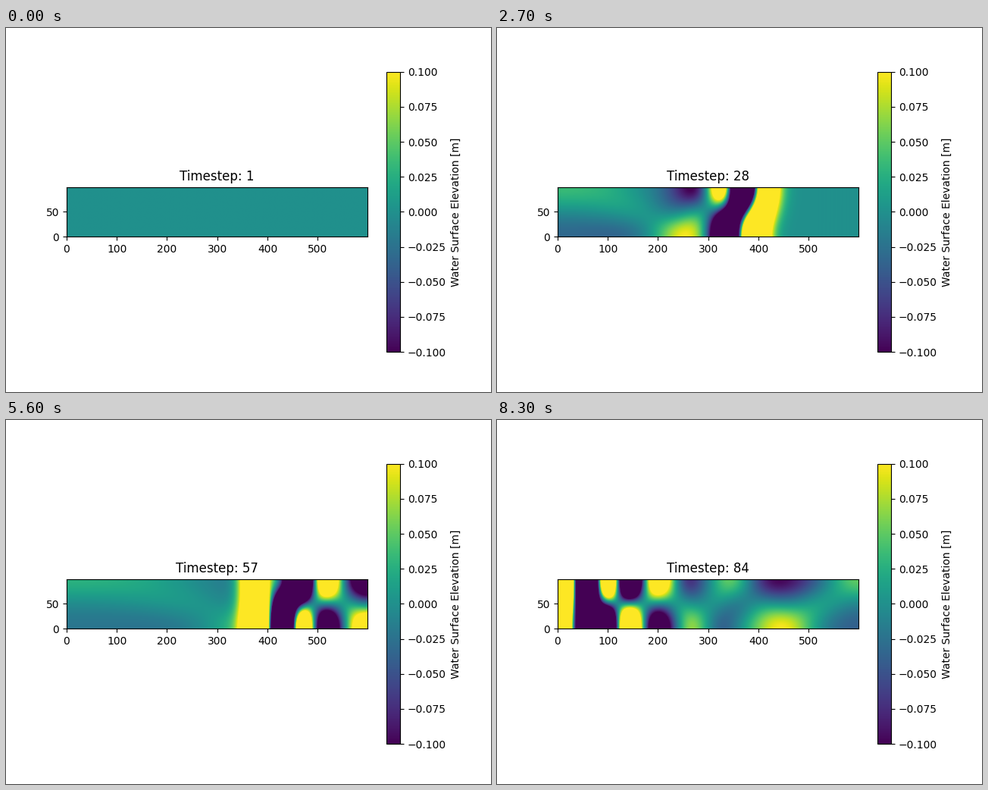
A matplotlib script that plays this animation: 640 by 480 pixels, repeating every 8.4 s.

```python
import numpy as np
import matplotlib.pyplot as plt
from matplotlib.animation import FuncAnimation

# Linear shallow water in a closed channel, driven by a moving pressure patch
# and solved exactly in cosine modes.
NX, NY, STEPS, SUB = 600, 100, 84, 20
WAVE_SPEED, SHIP_SPEED = 14.0, 15.0
SHIP_START, SHIP_LEN, SHIP_WIDTH = -12.0, 25.0, 32.0
PRESSURE = 0.185
MODES_X, MODES_Y = 150, 6


def cosine_basis(modes, cells):
    k = np.arange(modes) * np.pi / cells
    basis = np.cos(np.outer(k, np.arange(cells) + 0.5))
    norm = np.where(k > 0, 2.0, 1.0) / cells
    return k, basis, norm


def bump(pos, centre, size):
    return np.exp(-0.5 * ((pos - centre) / size) ** 2)


kx, bx, norm_x = cosine_basis(MODES_X, NX)
ky, by, norm_y = cosine_basis(MODES_Y, NY)
omega = WAVE_SPEED * np.hypot(ky[:, None], kx[None, :])
x = np.arange(NX) + 0.5
y = np.arange(NY) + 0.5
ship_y = PRESSURE * norm_y * (by @ bump(y, NY, SHIP_WIDTH))


def simulate():
    dt = 1.0 / SUB
    turn, swing = np.cos(omega * dt), np.sin(omega * dt)
    drift = dt * np.sinc(omega * dt / np.pi)
    level, rate = np.zeros_like(omega), np.zeros_like(omega)
    fields = [np.zeros((NY, NX))]
    for i in range((STEPS - 1) * SUB):
        centre = SHIP_START + SHIP_SPEED * (i + 0.5) * dt
        ship_x = norm_x * (bx @ bump(x, centre, SHIP_LEN))
        kick = -0.5 * dt * omega ** 2 * np.outer(ship_y, ship_x)
        rate = rate + kick
        level, rate = (level * turn + rate * drift,
                       rate * turn - level * omega * swing)
        rate = rate + kick
        if (i + 1) % SUB == 0:
            fields.append(by.T @ level @ bx)
    return fields


fields = simulate()

fig, ax = plt.subplots(figsize=(6.4, 4.8), dpi=100)
image = ax.imshow(fields[0], origin="lower", extent=(0, NX - 1, 0, NY - 1),
                  cmap="viridis", vmin=-0.1, vmax=0.1,
                  interpolation="bilinear")
ax.set_xticks(range(0, 600, 100))
ax.set_yticks([0, 50])
title = ax.set_title("Timestep: 1")
fig.colorbar(image, ax=ax, label="Water Surface Elevation [m]")


def draw(i):
    image.set_data(fields[i])
    title.set_text(f"Timestep: {i + 1}")
    return image, title


anim = FuncAnimation(fig, draw, frames=STEPS, interval=100,
                     init_func=lambda: draw(0), repeat=True, repeat_delay=0)
plt.show()
```
